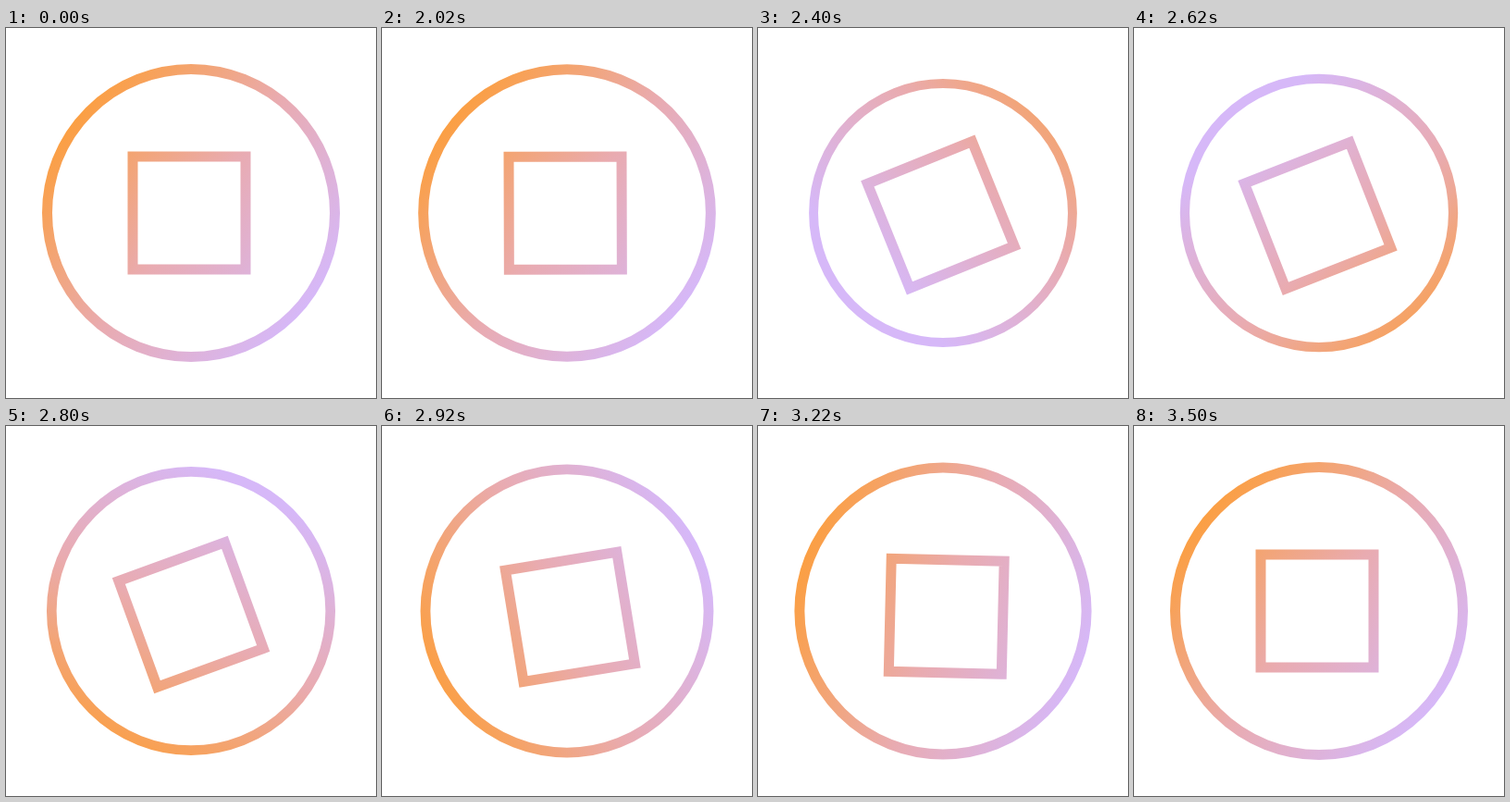
Write an HTML page with a canvas that moves like this. It is 400 px wide and 400 px high and loops after 3.52 s.

```html
<!DOCTYPE html>
<html lang="en">
<head>
<meta charset="utf-8">
<title>Ring and square</title>
<style>
  html, body { margin: 0; width: 100%; height: 100%; overflow: hidden; background: #fff; }
  canvas { display: block; width: 400px; height: 400px; }
</style>
</head>
<body>
<canvas id="stage" width="400" height="400"></canvas>
<script>
const ctx = document.getElementById('stage').getContext('2d');
const LOOP = 3520;
const LINE = 11;

// Each track lists values at these times.
const TIMES = [2005, 2200, 2400, 2800, 3050, 3500];
const TRACKS = {
  spin:  [0, 29, 97, 260, 322, 360],
  scale: [1, 0.938, 0.9, 0.969, 0.994, 1],
  shade: [0, 18, 62, 14, 0, 0],
  tilt:  [0, -12, -22, -20, 2, 0],
  x:     [198, 207.5, 197.7, 200, 206.5, 198],
  y:     [200, 208, 202, 204, 208.5, 200]
};

const rad = deg => deg * Math.PI / 180;

// Slope that never overshoots a key; flat at peaks and at both ends.
function slope(v, i) {
  if (i === 0 || i === v.length - 1) return 0;
  const a = (v[i] - v[i - 1]) / (TIMES[i] - TIMES[i - 1]);
  const b = (v[i + 1] - v[i]) / (TIMES[i + 1] - TIMES[i]);
  return a * b > 0 ? 2 * a * b / (a + b) : 0;
}

function sample(v, t) {
  const last = TIMES.length - 1;
  if (t <= TIMES[0]) return v[0];
  if (t >= TIMES[last]) return v[last];
  const i = TIMES.findIndex(k => k > t) - 1;
  const span = TIMES[i + 1] - TIMES[i];
  const p = (t - TIMES[i]) / span;
  const q = 1 - p;
  return v[i] * q * q * (1 + 2 * p) + v[i + 1] * p * p * (3 - 2 * p)
    + span * p * q * (slope(v, i) * q - slope(v, i + 1) * p);
}

// The colour axis turns by spin and slides along itself by shade.
function makeGradient(spin, shade) {
  const a = rad(spin - 142);
  const at = d => [200 + Math.cos(a) * d, 200 + Math.sin(a) * d];
  const g = ctx.createLinearGradient(...at(161 + shade), ...at(shade - 161));
  g.addColorStop(0, '#fb9f43');
  g.addColorStop(0.5, '#e9abb0');
  g.addColorStop(1, '#d6b8f8');
  return g;
}

function drawRing(scale) {
  ctx.lineWidth = LINE * scale;
  ctx.beginPath();
  ctx.arc(200, 200, 155.5 * scale, 0, Math.PI * 2);
  ctx.stroke();
}

function drawSquare(x, y, tilt) {
  const r = 61 * Math.SQRT2;
  ctx.lineWidth = LINE;
  ctx.beginPath();
  for (let i = 0; i < 4; i++) {
    const a = rad(tilt + 45 + i * 90);
    ctx.lineTo(x + r * Math.cos(a), y + r * Math.sin(a));
  }
  ctx.closePath();
  ctx.stroke();
}

function draw(t) {
  const s = {};
  for (const key in TRACKS) s[key] = sample(TRACKS[key], t);
  ctx.fillStyle = '#fff';
  ctx.fillRect(0, 0, 400, 400);
  ctx.strokeStyle = makeGradient(s.spin, s.shade);
  drawRing(s.scale);
  drawSquare(s.x, s.y, s.tilt);
}

const start = performance.now();
function tick() {
  draw((performance.now() - start) % LOOP);
  requestAnimationFrame(tick);
}
tick();
</script>
</body>
</html>
```
